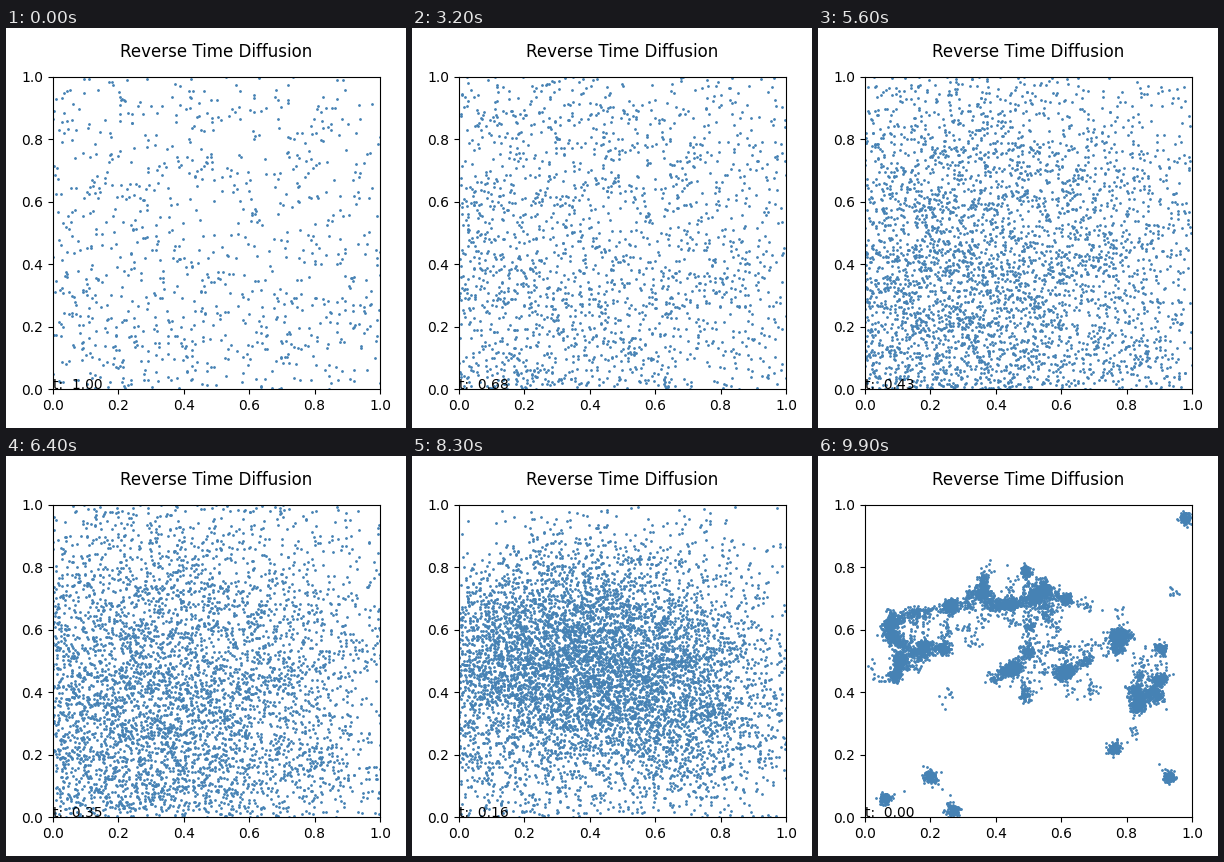
Recreate the animation shown at these times as a matplotlib script. Size 400 by 400 pixels, loop 10 s.

```python
import numpy as np
import matplotlib.pyplot as plt
from matplotlib.animation import FuncAnimation

FRAMES = 100
POINTS = 8000
SPREAD = 0.012

# Hubs gather several clusters around them; strays stand alone.
HUBS = [(.11, .50), (.08, .62), (.24, .54), (.26, .68), (.36, .72), (.44, .68),
        (.52, .70), (.55, .73), (.46, .48), (.62, .47), (.78, .59), (.84, .36),
        (.90, .44)]
STRAYS = [(.20, .13), (.06, .06), (.27, .02), (.76, .22), (.93, .13), (.98, .96)]

rng = np.random.default_rng(7)


def scatter(points, copies, width):
    spots = np.repeat(points, copies, axis=0)
    return spots + rng.normal(0, width, spots.shape)


def build_mixture():
    """Hubs, clusters around them, strays and a faint halo, with weights."""
    hubs, strays = np.array(HUBS), np.array(STRAYS)
    clusters = scatter(hubs, 4, 0.045)
    halo = scatter(hubs, 5, 0.09)
    centers = np.vstack([hubs, clusters, strays, halo])
    weights = np.concatenate([
        np.full(len(hubs), 1.0),
        rng.uniform(0.2, 0.8, len(clusters)) ** 1.5,
        np.full(len(strays), 0.65),
        np.full(len(halo), 0.03),
    ])
    return centers, weights


def denoise(x, t, centers, weights):
    """Expected clean position of noisy points x at time t."""
    a = 1 - t
    var = (a * SPREAD) ** 2 + t ** 2
    d2 = ((x ** 2).sum(1)[:, None] - 2 * a * x @ centers.T
          + a ** 2 * (centers ** 2).sum(1))
    logits = np.log(weights) - d2 / (2 * var)
    p = np.exp(logits - logits.max(1, keepdims=True))
    p /= p.sum(1, keepdims=True)
    gain = a * SPREAD ** 2 / var
    return gain * x + (1 - gain * a) * (p @ centers)


def reverse_paths(times):
    centers, weights = build_mixture()
    x = rng.normal(size=(POINTS, 2))
    paths = [x]
    for t, nxt in zip(times[:-1], times[1:]):
        clean = denoise(x, t, centers, weights)
        x = clean + nxt / t * (x - clean)
        paths.append(x)
    return paths


times = np.linspace(1, 0, FRAMES)
paths = reverse_paths(times)

fig, ax = plt.subplots(figsize=(4, 4), dpi=100)
ax.set(xlim=(0, 1), ylim=(0, 1))
ax.set_title("Reverse Time Diffusion", pad=14.4)
fig.tight_layout()
dots, = ax.plot([], [], "o", color="steelblue", ms=1)
label = ax.text(0, 0, "")


def update(i):
    dots.set_data(paths[i][:, 0], paths[i][:, 1])
    label.set_text(f"t:  {times[i]:.2f}")
    return dots, label


anim = FuncAnimation(fig, update, frames=FRAMES, interval=100,
                     repeat=True, repeat_delay=0)
plt.show()
```
